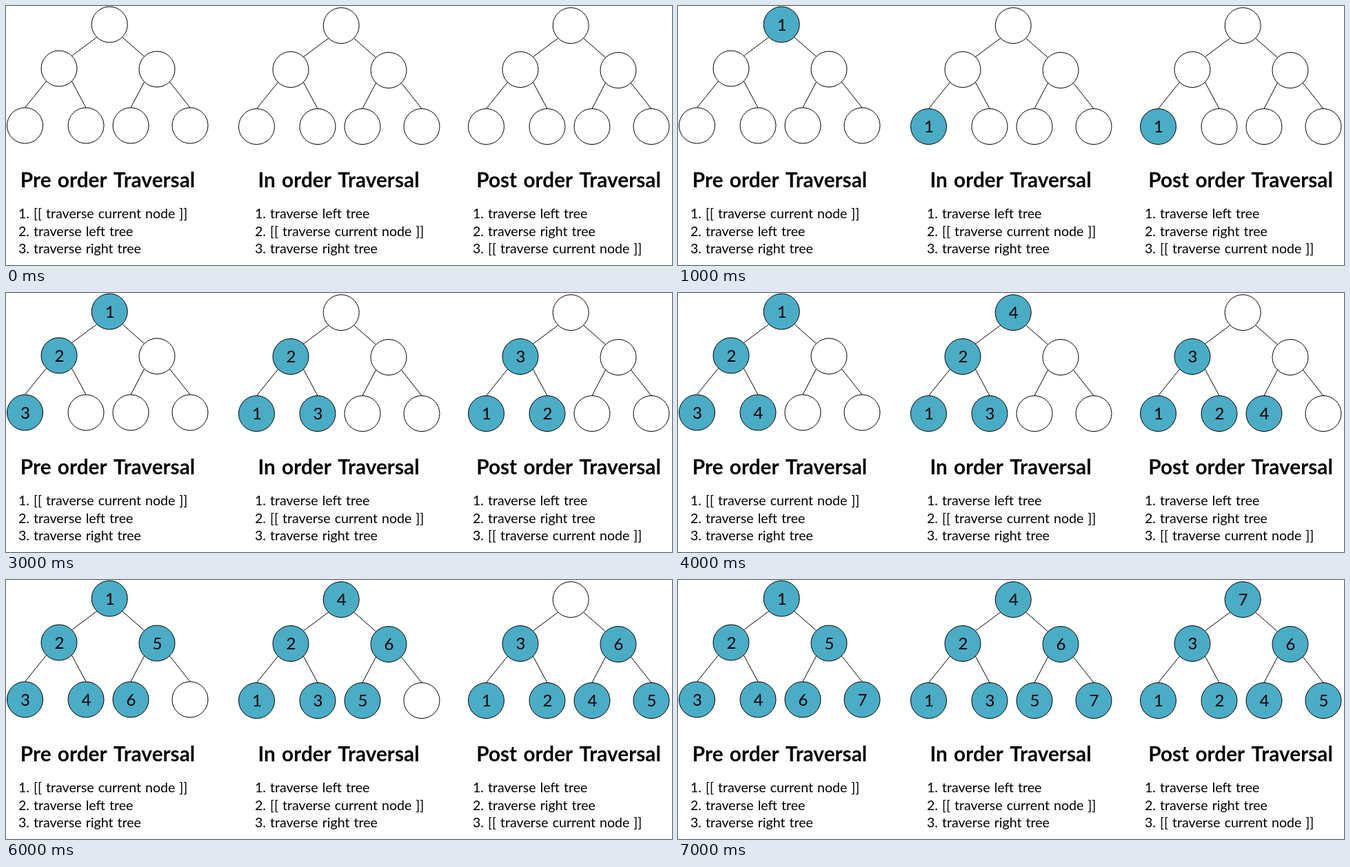
Recreate the animation shown at these times as an HTML page with a canvas. Size 966 px wide and 377 px high, loop 8000 ms.

```html
<!DOCTYPE html>
<html lang="en">
<head>
<meta charset="utf-8">
<title>Tree traversal orders</title>
<style>
  html, body { margin: 0; width: 100%; height: 100%; overflow: hidden; background: #fff; }
  canvas { display: block; }
</style>
</head>
<body>
<canvas id="stage" width="966" height="377"></canvas>
<script>
const ctx = document.getElementById('stage').getContext('2d');
const FONT = 'Lato, sans-serif';
const RADIUS = 26;
const STEP = 1000;
const LOOP = 8000;

// Heap order: the children of node i are 2i + 1 and 2i + 2.
const NODES = [[150.2, 27], [77, 91], [219, 92], [27.5, 174], [116, 174], [181, 174], [267, 174]];

const VISIT = '[[ traverse current node ]]';
const LEFT = 'traverse left tree';
const RIGHT = 'traverse right tree';

const TREES = [
  { x: 0, y: 0, title: 'Pre order Traversal', titleX: 147.5, listX: 18,
    steps: [VISIT, LEFT, RIGHT], ranks: [1, 2, 5, 3, 4, 6, 7] },
  { x: 336, y: 1.5, title: 'In order Traversal', titleX: 482.5, listX: 361,
    steps: [LEFT, VISIT, RIGHT], ranks: [4, 2, 6, 1, 3, 5, 7] },
  { x: 669, y: 1.5, title: 'Post order Traversal', titleX: 816, listX: 677,
    steps: [LEFT, RIGHT, VISIT], ranks: [7, 3, 6, 1, 2, 4, 5] }
];

function text(str, x, y, font, align, wordGap = 0) {
  ctx.font = `${font} ${FONT}`;
  ctx.textAlign = align;
  ctx.wordSpacing = `${wordGap}px`;
  ctx.fillStyle = '#000';
  ctx.fillText(str, x, y);
}

// Edges leave a node on its diagonal and meet a leaf at its top.
function drawEdge(parent, child) {
  const [px, py] = NODES[parent];
  const [cx, cy] = NODES[child];
  const side = Math.sign(cx - px);
  const d = RADIUS * Math.SQRT1_2;
  ctx.beginPath();
  ctx.moveTo(px + side * d, py + d);
  if (child > 2) ctx.lineTo(cx, cy - RADIUS);
  else ctx.lineTo(cx - side * d, cy - d);
  ctx.stroke();
}

function drawNode([x, y], rank, count) {
  const visited = rank <= count;
  ctx.beginPath();
  ctx.arc(x, y, RADIUS, 0, Math.PI * 2);
  ctx.fillStyle = visited ? '#4bacc6' : '#fff';
  ctx.fill();
  ctx.stroke();
  if (visited) text(rank, x + 0.4, y + 8.5, '24px', 'center');
}

function drawTree(tree, count) {
  ctx.save();
  ctx.translate(tree.x, tree.y);
  for (let i = 1; i < NODES.length; i++) drawEdge((i - 1) >> 1, i);
  NODES.forEach((node, i) => drawNode(node, tree.ranks[i], count));
  ctx.restore();

  text(tree.title, tree.titleX, 264, 'bold 29.8px', 'center', 2);
  tree.steps.forEach((step, i) =>
    text(`${i + 1}. ${step}`, tree.listX, Math.round(309 + i * 25.6), '19.6px', 'left', 1));
}

function frame(now) {
  const count = Math.floor((now % LOOP) / STEP);
  ctx.fillStyle = '#fff';
  ctx.fillRect(0, 0, 966, 377);
  ctx.strokeStyle = '#000';
  ctx.lineWidth = 1;
  TREES.forEach(tree => drawTree(tree, count));
  requestAnimationFrame(frame);
}
requestAnimationFrame(frame);
</script>
</body>
</html>
```
